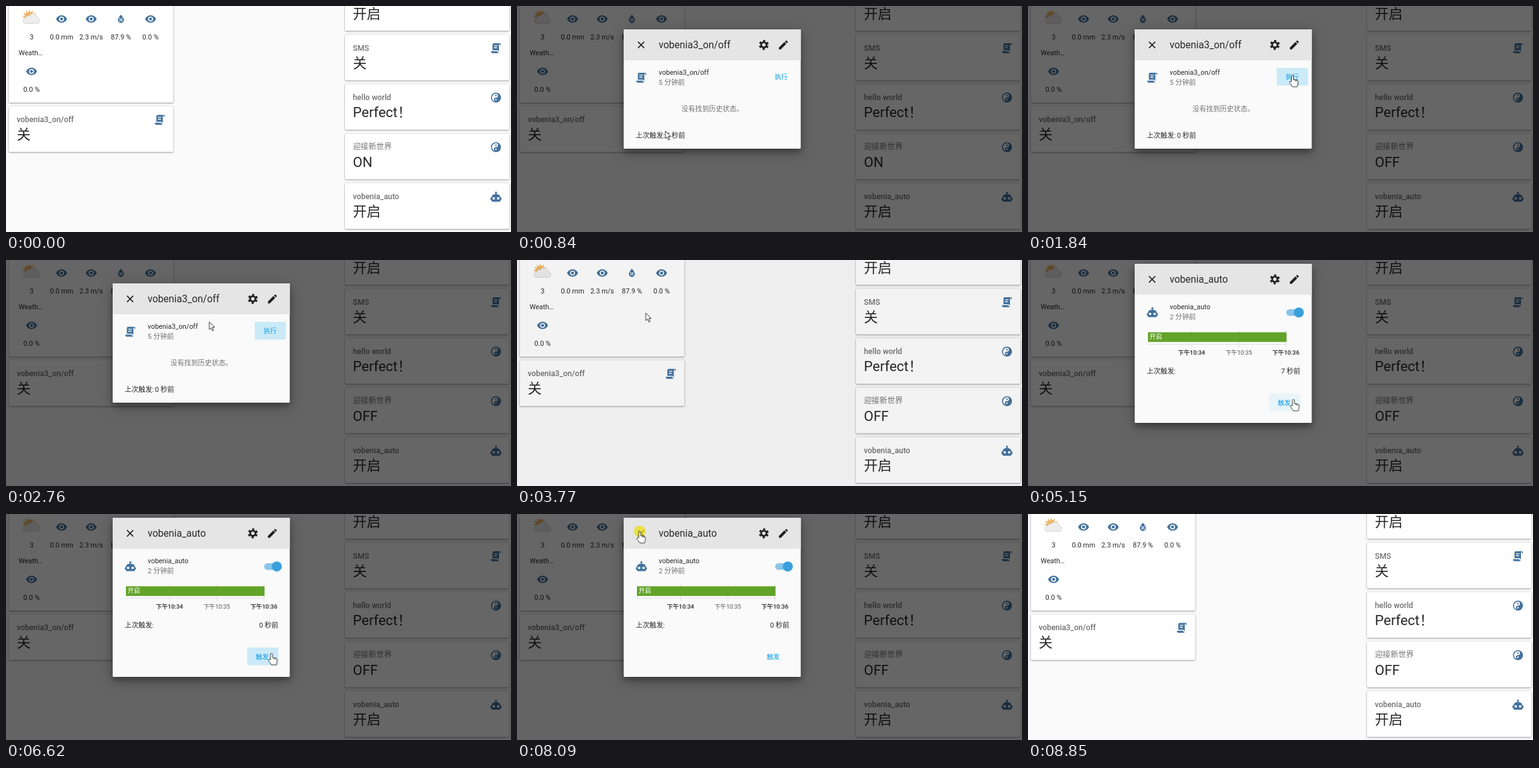
These frames come from a looping animation (800 px wide and 358 px high, 9710 ms). An HTML page:

```html
<!DOCTYPE html>
<html lang="zh-CN">
<head>
<meta charset="utf-8">
<title>Dashboard</title>
<style>
html, body { margin: 0; width: 100%; height: 100%; overflow: hidden; background: #fafafa; }
svg { display: block; width: 800px; height: 358px; font: 10.9px Roboto, "Noto Sans CJK SC", "Noto Sans CJK", sans-serif; fill: #282828; }
.card { fill: #fff; filter: drop-shadow(0 1px .8px rgba(0,0,0,.32)) drop-shadow(0 .5px 1.5px rgba(0,0,0,.14)); }
.name { font-size: 12.35px; font-weight: 500; fill: #727272; }
.cjk { font-weight: 400; }
.value { font-size: 22px; }
.title { font-size: 15.6px; }
.muted { fill: #727272; }
.mid { text-anchor: middle; }
.end { text-anchor: end; }
.icon { fill: #44739e; }
.tool { fill: #212121; }
.hole { fill: #fff; }
.cut { fill: none; stroke: #fff; stroke-width: 1.8; }
.ink { fill: none; stroke: #212121; stroke-width: 2; }
.action { font-size: 10.2px; font-weight: 500; fill: #039be5; text-anchor: middle; }
.panel { fill: #fafafa; filter: drop-shadow(0 5px 5px rgba(0,0,0,.3)) drop-shadow(0 4px 11px rgba(0,0,0,.25)); }
.head { fill: #e5e5e5; }
.tick { font-size: 9.4px; text-anchor: middle; fill: #555; }
.major { font-weight: 700; fill: #444; }
.grid { stroke: #ddd; fill: none; }
.pointer { fill: #fff; stroke: #222; stroke-width: .9; stroke-linejoin: round; }
</style>
</head>
<body>
<svg id="stage" viewBox="0 0 800 358"></svg>
<script>
const LOOP = 9710;
const NAME = 'vobenia';

const text = (x, y, s, cls = '', id = '') => `<text x="${x}" y="${y}" class="${cls}" id="${id}">${s}</text>`;
const rect = (x, y, w, h, attrs = '') => `<rect x="${x}" y="${y}" width="${w}" height="${h}" ${attrs}/>`;
const shape = (d, cls = '') => `<path d="${d}" class="${cls}"/>`;
const dot = (x, y, r, cls = '') => `<circle cx="${x}" cy="${y}" r="${r}" class="${cls}"/>`;

// Icons live on a 24 unit grid.
const icons = {
  eye: shape('M1 12C3 7.5 7 4.5 12 4.5S21 7.5 23 12C21 16.5 17 19.5 12 19.5S3 16.5 1 12Z') +
    dot(12, 12, 5, 'hole') + dot(12, 12, 3),
  drop: shape('M12 3.25S6 10 6 14a6 6 0 0 0 12 0C18 10 12 3.25 12 3.25Z') +
    shape('M9 16.5L15 10.5', 'cut') + dot(9.75, 11.25, 1.25, 'hole') + dot(14.25, 15.75, 1.25, 'hole'),
  script: shape('M8 2H19a3 3 0 0 1 3 3V6H18V18H17a1 1 0 0 1-1-1V16H5V5a3 3 0 0 1 3-3Z') +
    shape('M2 18H14.2a3 3 0 0 0 3.6 2a3 3 0 0 1-2.8 2H5a3 3 0 0 1-3-3Z') +
    shape('M8 7H15M8 11H14M19 4V6.5', 'cut'),
  balance: dot(12, 12, 10) + shape('M12 4A8 8 0 0 0 12 20A4 4 0 0 1 12 12A4 4 0 0 0 12 4Z', 'hole') +
    dot(12, 8, 1.5) + dot(12, 16, 1.5, 'hole'),
  robot: dot(12, 4, 2) + rect(11, 5, 2, 3) + rect(1, 14, 22, 5, 'rx="1"') +
    shape('M3 14a7 7 0 0 1 7-7h4a7 7 0 0 1 7 7v6a2 2 0 0 1-2 2H5a2 2 0 0 1-2-2Z') +
    dot(7.5, 15.5, 2.5, 'hole') + dot(16.5, 15.5, 2.5, 'hole'),
  close: shape('M5.7 5.7L18.3 18.3M18.3 5.7L5.7 18.3', 'ink'),
  pencil: shape('M3 17.2V21H6.8L17.8 10L14 6.2ZM15.1 5.1L17.7 2.9L21.1 6.3L18.9 8.9Z'),
  gear: '<g fill="none" stroke="#212121"><circle cx="12" cy="12" r="5.3" stroke-width="3.7"/>' +
    '<circle cx="12" cy="12" r="8.3" stroke-width="3.2" pathLength="12" stroke-dasharray="1 1" transform="rotate(15 12 12)"/></g>'
};
const icon = (name, x, y, cls = '') =>
  `<g class="icon ${cls}" transform="translate(${x} ${y}) scale(.79) translate(-12 -12)">${icons[name]}</g>`;

const fixed = s => (x, y) => text(x, y, s, 'value');
const onOff = (x, y) => text(x, y, 'ON', 'value', 'on') + text(x, y, 'OFF', 'value', 'off');
const card = (x, y, name, value, glyph, nameClass = '') =>
  rect(x, y, 260.5, 72.3, 'rx="1.6" class="card"') +
  text(x + 12.5, y + 25.2, name, 'name ' + nameClass) +
  value(x + 12.5, y + 52.5) + icon(glyph, x + 239.2, y + 21.4);

function sun(cx, cy) {
  const points = Array.from({ length: 24 }, (_, i) => {
    const r = i % 2 ? 7 : 11.5, a = i * Math.PI / 12;
    return `${cx + r * Math.cos(a)},${cy + r * Math.sin(a)}`;
  });
  return `<polygon points="${points.join(' ')}" fill="#efb765"/>`;
}

const sensors = [['0.0 mm', 'eye'], ['2.3 m/s', 'eye'], ['87.9 %', 'drop'], ['0.0 %', 'eye']];
const weather = rect(4.5, -20, 260.5, 173, 'rx="1.6" class="card"') + sun(37, 17) +
  '<path d="M31 27.5a4.2 4.2 0 0 1 0-8.4a5 5 0 0 1 6-3.2a7 7 0 0 1 13 3a4.4 4.4 0 0 1 0 8.6Z" fill="#ededed" stroke="#d2cfca" stroke-width=".8"/>' +
  sensors.map(([s, glyph], i) => icon(glyph, 88 + 47 * i, 20.6) + text(88 + 47 * i, 53, s, 'mid')).join('') +
  text(40.5, 53, '3', 'mid') + text(39, 78, 'Weath…', 'mid') +
  icon('eye', 40.5, 103.6) + text(40.5, 136, '0.0 %', 'mid');

const column = [
  ['', fixed('开启'), 'robot'],
  ['SMS', fixed('关'), 'script'],
  ['hello world', fixed('Perfect！'), 'balance'],
  ['迎接新世界', onOff, 'balance', 'cjk'],
  [NAME + '_auto', fixed('开启'), 'robot']
];
const page = weather + card(4.5, 158.9, NAME + '3_on/off', fixed('关'), 'script') +
  column.map((entry, i) => card(537, 78.4 * i - 33, ...entry)).join('');

const dialog = (id, y, h, name, glyph, since, body) => `<g id="${id}">` +
  rect(169, y, 280.5, h, 'rx="1.6" class="panel"') + rect(169, y, 280.5, 49, 'class="head"') +
  text(224.5, y + 30, name, 'title') +
  icon('close', 196.6, y + 24.6, 'tool') + icon('gear', 391, y + 24.6) + icon('pencil', 422, y + 24.6, 'tool') +
  icon(glyph, 197, y + 76.6) + text(224.5, y + 72, name) + text(224.5, y + 88, since, 'muted') +
  body + '</g>';

const button = (id, x, y, label, offset) =>
  rect(x, y, 49.5, 28, `rx="2" fill="#03a9f4" id="${id}"`) + text(x + offset, y + 18, label, 'action');

const scriptDialog = dialog('scriptDialog', 37, 189, NAME + '3_on/off', 'script', '5 分钟前',
  button('runGlow', 394, 98, '执行', 24.5) +
  text(260.5, 167, '没有找到历史状态。', 'muted') + text(188, 209, '上次触发:') +
  text(236, 209, '5', '', 'runOld') + text(236, 209, '0', '', 'runNew') + text(244.7, 209, '秒前'));

const ticks = [34, 35, 36].map((minute, i) => {
  const x = 259.5 + 74.7 * i;
  return shape(`M${x} 111V138`, 'grid') + text(x - .5, 149.7, '下午10:' + minute, i === 1 ? 'tick' : 'tick major');
}).join('');
const autoDialog = dialog('autoDialog', 6, 252, NAME + '_auto', 'robot', '2 分钟前',
  rect(409, 78, 27, 10.5, 'rx="5.2" fill="#88c5e9"') + '<circle cx="429" cy="83.2" r="8" fill="#38a0dd"/>' +
  shape('M190 133.5H409.5', 'grid') + ticks + rect(190, 114.5, 219.5, 15.3, 'fill="#62a329"') +
  '<text x="192.5" y="125" fill="#fff" font-size="10">开启</text>' + text(188, 180, '上次触发:') +
  text(431.5, 180, '7 秒前', 'end', 'fireOld') + text(431.5, 180, '0 秒前', 'end', 'fireNew') +
  button('fireGlow', 382, 211.5, '触发', 24));

const cursor = `<g id="visible"><g id="cursor">
  <circle id="press" cy="-.5" r="9.2" fill="#e8df10" fill-opacity=".75"/>
  <path id="arrow" class="pointer" d="M0 0V12L2.8 9.4L4.8 14.2L6.8 13.4L4.9 8.7H8.5Z"/>
  <path id="hand" class="pointer" d="M-1.6 10V1.6a1.6 1.6 0 0 1 3.2 0V6.5Q9 6.5 9 10Q9 14 7.5 18H0L-4.8 11Q-3.5 8-1.6 10ZM4.2 7V9.5M6.7 7.5V9.5"/></g></g>`;

document.getElementById('stage').innerHTML =
  rect(0, 0, 800, 358, 'fill="#fafafa"') + page +
  rect(0, 0, 800, 358, 'fill="#000" id="backdrop"') + scriptDialog + autoDialog + cursor;

// Each track turns [ms, value] stops into looping CSS keyframes.
const rules = [];
function track(id, prop, stops, easing = 'linear') {
  const all = [[0, stops[0][1]], ...stops, [LOOP, stops.at(-1)[1]]];
  const frames = all.map(([ms, v]) => `${ms / LOOP * 100}%{${prop}:${v}}`).join('');
  rules.push(`@keyframes ${id}{${frames}} #${id}{animation:${id} ${LOOP}ms ${easing} infinite}`);
}
const toggle = (id, first, times) =>
  track(id, 'opacity', [[0, first], ...times.map((ms, i) => [ms, i % 2 ? first : 1 - first])], 'step-end');
function swap(a, b, times) { toggle(a, 1, times); toggle(b, 0, times); }

// The cursor rests at each stop; stops with clicks show the hand.
const stop = (x, y, arrive, leave, ...clicks) => ({ x, y, arrive, leave, clicks });
const run = stop(419, 110, 1380, 2480, 1450, 1850, 2250);
const fire = stop(420.5, 221, 5080, 7330, 5400, 6400);
const tour = [
  stop(260, 262, 70, 70),
  stop(197, 196, 300, 600, 380),
  stop(235, 198, 840, 1000),
  run,
  stop(322, 98, 2760, 2760),
  stop(197, 68, 3040, 3460, 3070),
  stop(204, 84, 3770, 3770),
  stop(610, 312, 4310, 4540, 4390),
  fire,
  stop(194.5, 28, 7980, LOOP, 8070)
];
track('cursor', 'transform',
  tour.flatMap(({ x, y, arrive, leave }) => [arrive, leave].map(ms => [ms, `translate(${x}px,${y}px)`])), 'ease-in-out');
toggle('visible', 0, [70, 8850]);
swap('arrow', 'hand', tour.filter(s => s.clicks.length).flatMap(s => [s.arrive - 50, Math.min(s.leave + 50, LOOP)]));
toggle('press', 0, tour.flatMap(s => s.clicks).flatMap(ms => [ms, ms + 140]));

const fadeBetween = (open, close, peak, out) => [[open, 0], [open + 230, peak], [close, peak], [close + out, 0]];
const sessions = { scriptDialog: [460, 3460], autoDialog: [4460, 8240] };
for (const [id, span] of Object.entries(sessions)) track(id, 'opacity', fadeBetween(...span, 1, 230));
track('backdrop', 'opacity', Object.values(sessions).flatMap(span => fadeBetween(...span, .6, 337)));

const glow = (id, { arrive, clicks: [click] }, end) =>
  track(id, 'opacity', [[arrive - 50, 0], [arrive, .07], [click, .07], [click + 150, .19], [end, .19], [end + 200, 0]]);
glow('runGlow', run, sessions.scriptDialog[1] + 230);
glow('fireGlow', fire, fire.leave);

const effects = s => s.clicks.map(ms => ms + 80);
swap('on', 'off', [...effects(run), ...effects(fire)]);
swap('runOld', 'runNew', effects(run).slice(0, 1));
swap('fireOld', 'fireNew', effects(fire).slice(0, 1));

const style = document.createElement('style');
style.textContent = rules.join('\n');
document.head.append(style);
</script>
</body>
</html>
```
